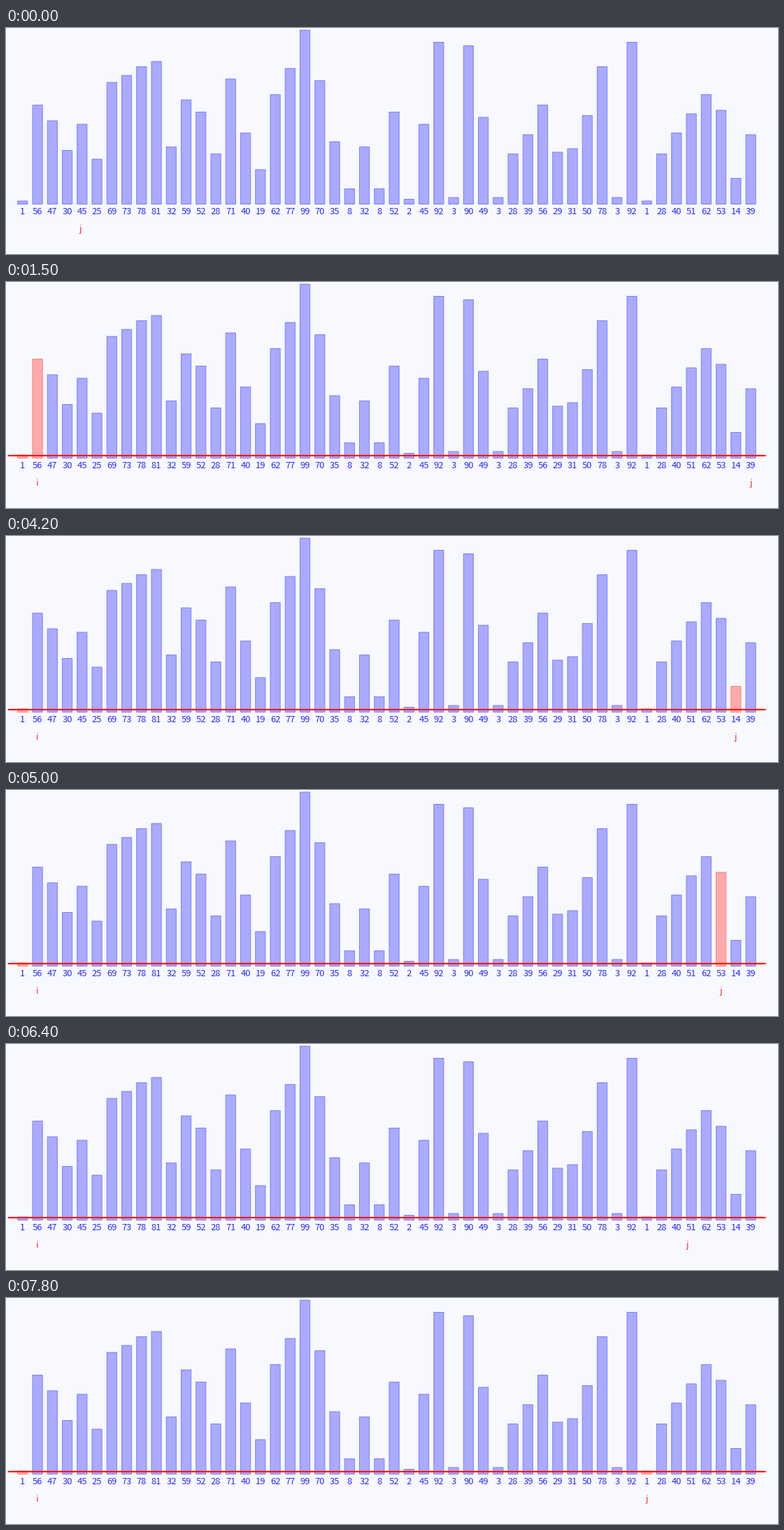
A matplotlib script for the animation above (8 s loop, 1104 px wide and 324 px high).

```python
import matplotlib.pyplot as plt
from matplotlib.animation import FuncAnimation
from matplotlib.patches import Rectangle

W, H, DPI = 1104, 324, 100
STEP_MS, FRAMES = 100, 80
PX = 72 / DPI

# The numbers being sorted; they are also the labels.
VALUES = [1, 56, 47, 30, 45, 25, 69, 73, 78, 81, 32, 59, 52, 28, 71, 40, 19,
          62, 77, 99, 70, 35, 8, 32, 8, 52, 2, 45, 92, 3, 90, 49, 3, 28, 39,
          56, 29, 31, 50, 78, 3, 92, 1, 28, 40, 51, 62, 53, 14, 39]
LAST = len(VALUES) - 1
LEFT, PITCH = 16.75, 21.25
BAR_W = PITCH * 2 / 3
BASE = 252.5

BLUE = ("#aaaaff", "#7e7eff")
RED = ("#ffaaaa", "#ff7e7e")
FONT = dict(family="Noto Sans CJK JP", fontsize=13 * PX,
            ha="center", va="baseline")

HIDDEN_X, START_X = -50, 106
LINE_ON, I_CHECK, J_CHECK = 2, 15, 27


def center(index):
    return LEFT + BAR_W / 2 + PITCH * index


def sweep(n):
    """Both pointers glide in from the left edge in the same time."""
    p = (max(0, n - 1) / 13) ** 1.08
    j = min(center(LAST), START_X + 936 * p)
    share = (j - HIDDEN_X) / (center(LAST) - HIDDEN_X)
    return HIDDEN_X + (center(1) - HIDDEN_X) * share, j


def move_time(k):
    """Start and length, in steps, of j's k-th move: one slow, then brisk."""
    return (35, 7) if k == 0 else (47 + 5.6 * (k - 1), 2.6)


def state(n):
    """Positions of i and j and the set of highlighted bars."""
    if n < I_CHECK:
        return *sweep(n), set()
    if n < J_CHECK:
        return center(1), center(LAST), {0, 1}
    t, k = n + 0.5, 0
    while t >= move_time(k + 1)[0]:
        k += 1
    start, length = move_time(k)
    p = min(1, max(0, (t - start) / length))
    pos = LAST - k - p
    lit = {0, round(pos)} if p in (0, 1) else set()
    return center(1), center(pos), lit


fig = plt.figure(figsize=(W / DPI, H / DPI), dpi=DPI, facecolor="#f8f9ff")
ax = fig.add_axes([0, 0, 1, 1])
ax.set_xlim(0, W)
ax.set_ylim(H, 0)
ax.axis("off")

bars = []
for k, v in enumerate(VALUES):
    height = 2.5 * v + 2
    bar = Rectangle((LEFT + PITCH * k, BASE - height), BAR_W, height,
                    facecolor=BLUE[0], edgecolor=BLUE[1], lw=PX, snap=False)
    bars.append(ax.add_patch(bar))
    ax.text(center(k), 267, str(v), color="#2a2aff", **FONT)

line = ax.add_patch(Rectangle((3, 247.8), 1083.5, 2.2, facecolor="#ff1414",
                              lw=0, snap=False, zorder=3))
mark_i, mark_j = (ax.text(0, 292, name, color="#ff2a2a", clip_on=True, **FONT)
                  for name in "ij")


def draw(n):
    xi, xj, lit = state(n)
    mark_i.set_x(xi)
    mark_i.set_visible(xi > -5)
    mark_j.set_x(xj)
    line.set_visible(n >= LINE_ON)
    for k, bar in enumerate(bars):
        fill, edge = RED if k in lit else BLUE
        bar.set_facecolor(fill)
        bar.set_edgecolor(edge)
    return [*bars, line, mark_i, mark_j]


anim = FuncAnimation(fig, draw, frames=FRAMES, interval=STEP_MS,
                     init_func=lambda: draw(0), repeat=True, repeat_delay=0,
                     blit=False)
plt.show()
```
